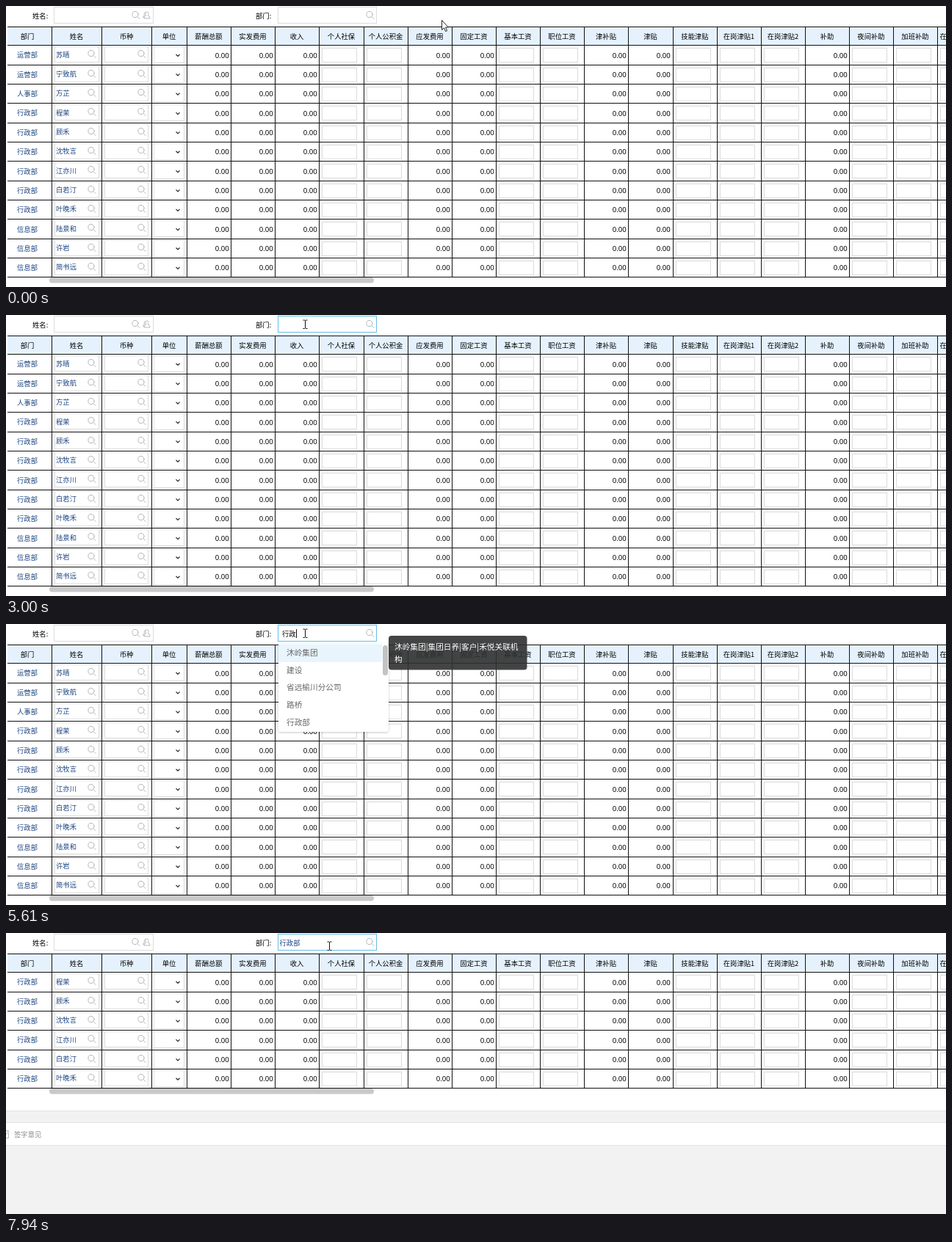
Write an HTML page that moves like this. It is 1280 by 383 pixels and loops after 8000 ms.

```html
<!DOCTYPE html>
<html lang="zh">
<head>
<meta charset="utf-8">
<title>Payroll table filter</title>
<style>
html, body { margin: 0; width: 100%; height: 100%; overflow: hidden; background: #fff; }
svg { display: block; font: 9.33px "Noto Sans CJK SC", "Noto Sans CJK", "Noto Sans", sans-serif; }
text { white-space: pre; }
.n { font: 9.6px "Noto Sans", "Open Sans", sans-serif; text-anchor: end; }
.m { text-anchor: middle; }
.b { fill: #1b4480; }
.box { fill: #fff; stroke: #dcdcdc; }
.on { stroke: #63bfe8; }
.ico { fill: none; stroke: #b4b8bd; stroke-width: 1; stroke-linecap: round; }
.big { font-size: 10.67px; }
</style>
</head>
<body>
<svg id="stage" width="1280" height="383" viewBox="0 0 1280 383"></svg>
<script>
const LOOP = 8000, ROW = 26.33, TOP = 53.9;
const heads = ['部门', '姓名', '币种', '单位', '薪酬总额', '实发费用', '收入', '个人社保', '个人公积金',
  '应发费用', '固定工资', '基本工资', '职位工资', '津补贴', '津贴', '技能津贴', '在岗津贴1', '在岗津贴2',
  '补助', '夜间补助', '加班补助', '在岗加班补贴'];
const kinds = 'NNNIINNIINNIIINIII';
const staff = [['运营部', '苏晴'], ['运营部', '宁致航'], ['人事部', '方芷'], ['行政部', '程茉'],
  ['行政部', '顾禾'], ['行政部', '沈牧言'], ['行政部', '江亦川'], ['行政部', '白若汀'],
  ['行政部', '叶晚禾'], ['信息部', '陆景和'], ['信息部', '许岩'], ['信息部', '简书远']];
const group = '沐岭集团', parent = '禾悦';
const options = [group, '建设', '省远榆川分公司', '路桥', '行政部'];

const colX = i => i < 4 ? [2, 62, 130, 198][i] : Math.floor(246.6 + 60.13 * (i - 4));
const rowY = i => Math.floor(TOP + ROW * i);

const rect = (x, y, w, h, attr = '') => `<rect x="${x}" y="${y}" width="${w}" height="${h}" ${attr}/>`;
const text = (x, y, s, attr = '') => `<text x="${x}" y="${y}" ${attr}>${s}</text>`;
const path = (d, attr = '') => `<path d="${d}" ${attr}/>`;
const layer = (id, body = '') => `<g id="${id}">${body}</g>`;
const box = (x, y, w, h, cls = 'box') => rect(x + .5, y + .5, w, h, `class="${cls}"`);
const lens = (x, y) => `<circle cx="${x}" cy="${y}" r="4.1" class="ico"/>`
  + path(`M${x + 3} ${y + 3}l3 3`, 'class="ico"');

function row([dept, name], i) {
  const y = rowY(i), c = 67 + 26.35 * i;
  let s = text(29, c + 3.4, dept, 'class="m b"')
    + box(66, y + 2, 60, 21) + text(68, c + 2.6, name, 'class="b"') + lens(116, y + 11.5)
    + box(134, y + 2, 59, 21) + lens(184, y + 11.5)
    + box(201, y + 2, 41, 22)
    + path(`M231.5 ${c - 1}l2.5 2.5 2.5 -2.5`, 'fill="none" stroke="#222" stroke-width="1.2"');
  [...kinds].forEach((k, j) => {
    const x = colX(j + 4);
    s += k === 'N' ? text(x + 57.8, c + 3.6, '0.00', 'class="n"') : box(x + 4, y + 4, 47, 19);
  });
  return s;
}

function table(list) {
  const end = rowY(list.length);
  let s = rect(2, 28, 1278, 26, 'fill="#e5f2fd"');
  heads.forEach((h, i) => {
    const x = colX(i);
    s += i < 21 ? text((x + colX(i + 1)) / 2 - (i ? 0 : 3), 45, h, 'class="m"') : text(1271.5, 45, h);
  });
  s += list.map(row).join('');
  let lines = 'M2 28.5H1280';
  for (let i = 0; i <= list.length; i++) lines += `M2 ${rowY(i) + .5}H1280`;
  for (let i = 1; i < heads.length; i++) lines += `M${colX(i) + .5} 28V${end}`;
  return s + path(lines, 'stroke="#111" fill="none"')
    + rect(59, end + 1, 442, 7.5, 'rx="3.7" fill="#c9c9c9"');
}

const footer = rect(0, 242, 1280, 141, 'fill="#f2f2f2"') + rect(0, 259, 1280, 31, 'fill="#fff"')
  + path('M0 242.5H1280M0 258.5H1280M0 289.5H1280', 'stroke="#e2e2e2"')
  + path('M0 269.5H2.5M3.5 272V279.5H0M0 275L4 269', 'class="ico"')
  + text(11, 278, '签字意见', 'fill="#8a8a8a"');

const person = path('M188 16.5c0-2.5 1.5-3.2 3-3.6-1.6-1.4-1.4-5 1-5s2.6 3.6 1 5c1.5.4 3 1.1 3 3.6z'
  + 'M190 8.5c-2.2 0-2.2 3-1 4-1.4.3-2.3 1-2.3 3h1.5', 'class="ico"');

const shade = (id, a, b) => `<linearGradient id="${id}" x2="0" y2="1"><stop stop-opacity="${a}"/>`
  + `<stop offset="1" stop-opacity="${b}"/></linearGradient>`;

const stage = document.getElementById('stage');
stage.innerHTML = `<defs>${shade('up', 0, .24)}${shade('down', .42, 0)}
  <linearGradient id="ime"><stop offset=".45" stop-color="#fff"/><stop offset="1" stop-color="#fbe9ef"/></linearGradient>
  <filter id="soft" x="-10%" y="-10%" width="120%" height="125%">
  <feDropShadow dx="0" dy="1" stdDeviation="1.5" flood-opacity=".22"/></filter></defs>`
  + layer('all', table(staff))
  + layer('some', table(staff.filter(p => p[0] === '行政部')) + footer)
  + layer('hover')
  + text(36, 17, '姓名:') + box(65, 1, 135, 22) + lens(176, 11.5) + person
  + text(340, 17, '部门:') + layer('field') + layer('menu') + layer('popup') + layer('mouse');
const el = id => document.getElementById(id);
const show = (id, on) => el(id).setAttribute('display', on ? 'inline' : 'none');
const pen = document.createElement('canvas').getContext('2d');
function textWidth(s, size) {
  pen.font = `${size}px "Noto Sans CJK SC", "Noto Sans CJK", "Noto Sans", sans-serif`;
  return pen.measureText(s).width;
}

// The pointer advances in small hops while it is moving.
const moves = [[70, 480], [740, 1500], [1570, 2270], [6970, 7730], [7800, 7940]];
function snap(t) {
  let out = 0;
  for (const [a, b] of moves) {
    if (t < a) break;
    const d = (b - a) / Math.round((b - a) / 70);
    out = Math.min(b, a + Math.floor((t - a) / d + .001) * d);
  }
  return out;
}

const keys = [[0, 593, 19], [140, 540, 45], [280, 330, 110], [410, 185, 150], [480, 152, 151],
  [670, 152, 151], [740, 151, 135], [810, 147, 102], [950, 130, 82], [1150, 100, 67], [1500, 92, 64],
  [1570, 120, 60], [1640, 145, 52], [1800, 230, 32], [2000, 340, 17], [2270, 407, 12.5],
  [6900, 407, 12.5], [6970, 410, 17], [7110, 419, 28], [7180, 420, 31], [7400, 420, 31],
  [7730, 440, 25], [7940, 440, 17.5]];
function pointer(t) {
  let i = 1;
  while (i < keys.length - 1 && keys[i][0] < t) i++;
  const [t0, x0, y0] = keys[i - 1], [t1, x1, y1] = keys[i];
  const k = Math.max(0, Math.min(1, (t - t0) / (t1 - t0)));
  return [x0 + (x1 - x0) * k, y0 + (y1 - y0) * k];
}

const ink = 'fill="#fff" stroke="#111" stroke-width=".9"';
const shapes = {
  arrow: path('M.5 .5V13.5L3.5 10.8 5.5 15.6 7.6 14.7 5.6 10H9.3z', ink),
  beam: path('M-2.5-5.5H-.5L.5-4.8 1.5-5.5H3.5M.5-5V5.5M-2.5 6H-.5L.5 5.3 1.5 6H3.5', 'fill="none" stroke="#111"'),
  hand: path('M-1 0c0-1.5 2-1.5 2 0v5l1-.2c1 0 1.4.6 1.4 1 1.2-.4 1.7.4 1.7 1 1-.2 1.5.4 1.5 1.2'
    + 'V11c0 2-1 2.5-1.2 5H-1.2C-1.5 13-4.5 11.5-4.8 9c0-1.2 1.6-1.6 2.4-.4L-1 10z', ink)
};
const cursorAt = t => t < 2130 ? 'arrow' : t < 7030 ? 'beam' : t < 7400 ? 'hand' : t < 7590 ? 'arrow' : 'beam';

function drawMouse(t) {
  const s = snap(t), [x, y] = pointer(s);
  el('mouse').innerHTML = `<g transform="translate(${x.toFixed(1)} ${y.toFixed(1)})">${shapes[cursorAt(s)]}</g>`;
}

// The row highlight trails the pointer slightly.
function drawHover(t) {
  const s = snap(t), y = pointer(s - 30)[1];
  let out = '';
  if (s < 1700 && y >= TOP) {
    const i = Math.floor((y - TOP) / ROW), a = rowY(i), b = rowY(i + 1);
    out = rect(2, a - 4, 1278, 5, 'fill="url(#up)"') + rect(2, b, 1278, 6, 'fill="url(#down)"');
  }
  if (t >= 1150 && t < 1700) out += path('M89.5 64l4.5 4.5m0-4.5l-4.5 4.5', 'stroke="#8d98a8" stroke-width=".9"');
  if (t >= 1570 && t < 1700) out += rect(134.5, 55.5, 59, 21, 'fill="none" class="on"');
  el('hover').innerHTML = out;
}

// Start time, committed part, composing part, candidates.
const typing = [
  [3860, '', 'x', '下 小 想 新 些'], [3970, '', 'xi', '系 西 洗 细 喜'], [4080, '', 'xin', '新 心 信 辛 欣'],
  [4190, '', 'xing', '性 行 * 型 姓'],
  [4610, '', 'xingz', '行政 行走 行 性'], [4700, '', 'xingzh', '行政 行者 行 性'],
  [4800, '', 'xingzhe', '行者 行政 行 性'], [4900, '', 'xingzhen', '行政 行阵 行 性'],
  [5000, '', 'xingzheng', '行政 行正 行 性'], [5100, '行政', '', ''],
  [5740, '行政', 'b', '不 吧 把 被 部'], [5880, '行政', 'bu', '部 不 步 布 补'], [6420, '行政部', '', '']];
const typed = t => typing.filter(k => k[0] <= t).pop() || [0, '', '', ''];

function drawField(t) {
  const lit = (t >= 2130 && t < 2400) || (t >= 2470 && t < 7110) || t >= 7590;
  const [, done, comp] = typed(t), str = done + comp;
  let s = box(370, 1, 134, 22, lit ? 'box on' : 'box') + lens(495, 11.5);
  if (t >= 7250) s += text(372.5, 17, '行政部', 'class="b"');
  else {
    s += text(376, 17, str);
    const caret = t >= 2470 && !(t >= 3000 && t < 3530);
    if (caret) s += rect(Math.round(376 + textWidth(str, 9.33)), 7, 1, 12, 'fill="#111"');
  }
  el('field').innerHTML = s;
}

const tip = (x, y, w, h) => rect(x, y, w, h, 'rx="4" fill="#303030" fill-opacity=".9"');
const tipText = (x, y, s) => text(x, y, s, 'class="big" fill="#fff"');
const panel = h => rect(371, 26.5, 150, h, 'rx="3" fill="#fff" filter="url(#soft)"');

function drawMenu(t) {
  let s = '';
  if (t >= 5210 && t < 6490) {
    s = panel(120.5) + rect(371, 27.5, 141, 24.5, 'fill="#e8f5fd"')
      + options.map((o, i) => text(382, 43 + 23.7 * i, o, 'class="big" fill="#666"')).join('')
      + rect(513, 29, 7, 41, 'rx="3.5" fill="#c3c3c3"')
      + tip(521, 16, 188.5, 46.5)
      + tipText(529, 34.8, `${group}|集团日养|客户|${parent}关联机`) + tipText(529, 51.5, '构');
  } else if (t >= 6620 && t < 7320) {
    const fade = t < 7110 ? 1 : t < 7250 ? .85 : .4;
    s = `<g opacity="${fade}">` + panel(26.5) + rect(371, 27.5, 149, 24.5, 'fill="#e8f5fd"')
      + text(382, 43, '行政部', 'class="big" fill="#777"')
      + path('M499.5 38.5l3 3 5-6', 'fill="none" stroke="#b9dcec"') + '</g>';
    if (t < 7250) s += tip(529, 26, 102.5, 27.5) + tipText(536.5, 43.7, `行政部|${parent}总公司`);
  }
  el('menu').innerHTML = s;
}

function finger(x, t) {
  const y = t >= 4330 && t < 4470 ? 45.5 : 44.5;
  return path(`M${x + 4} 50V${y}q1-1.5 2 0V49h3.5q2 .5 1.5 3-.5 4-4 4h-2q-2 0-5-5 .8-1.5 3 0z`,
    'fill="#fbdcc4" stroke="#eec3a2" stroke-width=".5"')
    + path(`M${x + 14.5} 55h6l-3 3z`, 'fill="#58a2e2"');
}

function drawPopup(t) {
  const [, done, comp, list] = typed(t);
  let s = '';
  if (comp) {
    const left = done ? 394 : 377;
    let x = left + 9, words = '';
    list.split(' ').forEach((w, i) => {
      const c = i ? '#2f86d6' : '#f0503c';
      words += text(x, 54, i + 1, `font-size="10.5" fill="${c}" fill-opacity=".75"`);
      words += w === '*' ? finger(x + 9, t) : text(x + 9, 54.5, w, `font-size="13" fill="${c}"`);
      x += w === '*' ? 42 : 20 + 13 * w.length;
    });
    const w = Math.max(221, x - left + 38), r = left + w;
    const end = left + 9 + textWidth(comp, 11.5);
    s = rect(left, 20, w, 42, 'rx="3" fill="url(#ime)" stroke="#a9cdf0" filter="url(#soft)"')
      + rect(left + 1, 40, w - 2, 21, 'rx="2" fill="#fff"')
      + text(left + 9, 34, comp, 'font-size="11.5" fill="#2f7fcf"')
      + rect(Math.round(end), 24, 1, 12, 'fill="#f0503c"')
      + `<circle cx="${r - 12}" cy="30" r="6.5" fill="#e5483d"/>` + words
      + path(`M${r - 32} 48l-2.5 2.8 2.5 2.8`, 'fill="none" stroke="#cfe0f0"')
      + path(`M${r - 23.5} 47.8l3 3-3 3M${r - 13.5} 49.5l3 3 3-3`, 'fill="none" stroke="#2f86d6" stroke-width="1.2"');
  }
  el('popup').innerHTML = s;
}

function draw(t) {
  show('all', t < 7320);
  show('some', t >= 7320);
  [drawHover, drawField, drawMenu, drawPopup, drawMouse].forEach(f => f(t));
}

function tick() {
  draw(performance.now() % LOOP);
  requestAnimationFrame(tick);
}
tick();
</script>
</body>
</html>
```
